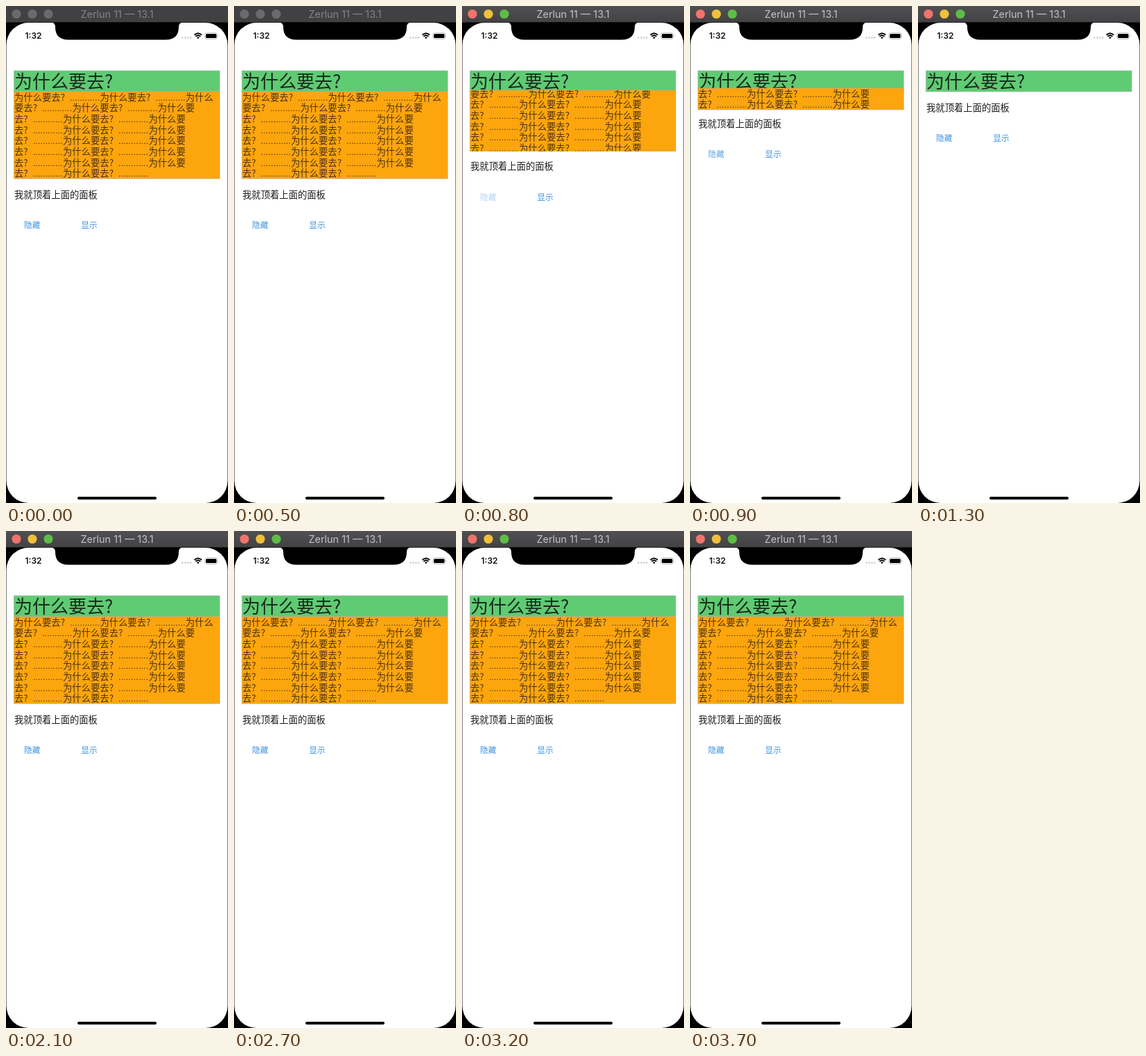
An HTML page that plays this animation: 320x714 px, repeating every 3800 ms.

```html
<!DOCTYPE html>
<html lang="zh-CN">
<head>
<meta charset="utf-8">
<title>面板</title>
<style>
html, body { margin: 0; width: 100%; height: 100%; overflow: hidden; background: #000; }
svg { display: block; width: 100vw; height: 100vh; }
.cjk { font-family: "Noto Sans CJK SC", "Noto Sans CJK", "Noto Sans CJK JP", sans-serif; }
.ui { font-family: Inter, Roboto, sans-serif; }
.dots { font-family: Roboto, sans-serif; font-size: 13.7px; }
</style>
</head>
<body>
<svg viewBox="0 0 320 714" preserveAspectRatio="none">
  <defs>
    <linearGradient id="activeBar" x1="0" y1="0" x2="0" y2="1">
      <stop offset="0" stop-color="#504f52"/>
      <stop offset="1" stop-color="#434245"/>
    </linearGradient>
    <clipPath id="bodyClip"><rect id="clipBox" x="11" width="297.5"/></clipPath>
  </defs>

  <rect width="320" height="714" fill="#000"/>
  <rect id="bar" width="320" height="23.5"/>
  <g id="lights"></g>
  <text id="title" class="ui" x="160" y="17" font-size="14.4" text-anchor="middle">Zerlun 11 — 13.1</text>

  <rect x="0.5" y="24" width="319" height="690" rx="32" fill="#fff"/>
  <path d="M65 23.5Q71 24 71 30C71 42 77 48.5 90 48.5H230C243 48.5 249 42 249 30Q249 24 255 23.5Z" fill="#000"/>
  <rect x="103" y="705" width="114" height="4" rx="2" fill="#000"/>

  <text class="ui" x="27.5" y="47.3" font-size="12" font-weight="600" fill="#111">1:32</text>
  <g id="signal" fill="#cfcfcf"></g>
  <g fill="none" stroke="#000" stroke-width="1.9">
    <path d="M271.4 41.6Q276.8 36.8 282.2 41.6"/>
    <path d="M273.3 43.8Q276.8 40.8 280.3 43.8"/>
  </g>
  <path d="M274.9 45.2Q276.8 43.8 278.7 45.2L276.8 47.3Z"/>
  <rect x="286.7" y="38.6" width="18" height="8.8" rx="2.6" fill="none" stroke="#aaa" stroke-width="0.8"/>
  <rect x="288" y="39.9" width="15.4" height="6.2" rx="1.5"/>
  <path d="M305.8 41.6Q307.4 43 305.8 44.4Z" fill="#aaa"/>

  <rect x="11.5" y="93" width="296.5" height="30" fill="#5fcb73" stroke="#9fb89f" stroke-width="0.8"/>
  <text class="cjk" x="12" y="117.6" font-size="26" fill="#18291b">为什么要去?</text>

  <g id="body">
    <rect id="fill" x="11.5" width="296.5" fill="#fda50d" stroke="#c3a873" stroke-width="0.8"/>
    <g clip-path="url(#bodyClip)">
      <g id="lines" class="cjk" font-size="13.33" fill="#4b3212"></g>
    </g>
  </g>

  <g id="below" class="cjk">
    <text x="12" y="276" font-size="13.33" fill="#1c1c1c">我就顶着上面的面板</text>
    <g font-size="11.7" fill="#3f94e0">
      <text id="hideBtn" x="26" y="319.3">隐藏</text>
      <text id="showBtn" x="108.3" y="319.3">显示</text>
    </g>
  </g>
</svg>

<script>
const LOOP = 3800, MOVE = 300, HIDE_AT = 685, SHOW_AT = 1802;
const TOP = 123, BOTTOM = 248, MIDDLE = (TOP + BOTTOM) / 2;
const CHAR = 13.33, DOTS = 43.4, LEADING = 15.63;
const NS = "http://www.w3.org/2000/svg";
const $ = id => document.getElementById(id);

function add(parent, tag, attrs, text) {
  const el = document.createElementNS(NS, tag);
  for (const key in attrs) el.setAttribute(key, attrs[key]);
  if (text) el.textContent = text;
  parent.append(el);
  return el;
}
const set = (id, attrs) => {
  for (const key in attrs) $(id).setAttribute(key, attrs[key]);
};

const lights = ["#f0736c", "#efc03c", "#5dbd48"].map((color, i) => ({
  color, el: add($("lights"), "circle", { cx: 15 + 23 * i, cy: 11.5, r: 6.6 })
}));
for (let i = 0; i < 4; i++) add($("signal"), "circle", { cx: 254.3 + 4 * i, cy: 45.6, r: 1.4 });

// Each "|" marks a run of dots; the question mark fills a full-width cell.
const middleLine = "去?|为什么要去?|为什么要";
const rows = [
  "为什么要去?|为什么要去?|为什么",
  "要去?|为什么要去?|为什么要",
  ...Array(5).fill(middleLine),
  "去?|为什么要去?|"
];
rows.forEach((row, i) => {
  const y = 135.8 + i * LEADING;
  let x = 12;
  row.split("|").forEach((part, k) => {
    if (k) {
      add($("lines"), "text", { x, y, class: "dots" }, ".".repeat(12));
      x += DOTS;
    }
    if (part) add($("lines"), "text", { x, y }, part);
    x += part.length * CHAR;
  });
});

const mix = (a, b, p) => a + (b - a) * p;
function ease(t, start) {
  const k = Math.min(1, Math.max(0, (t - start) / MOVE));
  return (1 - Math.cos(Math.PI * k)) / 2;
}
const pressed = (t, start) => t < start - 45 ? 1 : mix(0.12, 1, ease(t, start));

function draw(t) {
  const active = t >= 690;
  set("bar", { fill: active ? "url(#activeBar)" : "#414043" });
  set("title", { fill: active ? "#c4c3c5" : "#858486" });
  lights.forEach(({ color, el }) => el.setAttribute("fill", active ? color : "#6a696b"));

  const hidden = ease(t, HIDE_AT), shown = ease(t, SHOW_AT);
  const opening = t >= SHOW_AT;
  const top = opening ? mix(89, TOP, shown) : mix(TOP, 117, hidden);
  const bottom = opening ? mix(91.4, BOTTOM, shown) : mix(BOTTOM, 127, hidden);
  const open = opening ? shown : 1 - hidden;
  const box = { y: top, height: bottom - top };
  set("fill", box);
  set("clipBox", box);
  set("lines", { transform: `translate(0 ${(top + bottom) / 2 - MIDDLE})` });
  set("body", { visibility: open > 0 ? "visible" : "hidden" });
  set("below", { transform: `translate(0 ${-125 * (1 - open)})` });
  set("hideBtn", { opacity: pressed(t, HIDE_AT) });
  set("showBtn", { opacity: pressed(t, SHOW_AT) });
}

const begin = performance.now();
function tick() {
  draw((performance.now() - begin) % LOOP);
  requestAnimationFrame(tick);
}
tick();
</script>
</body>
</html>
```
